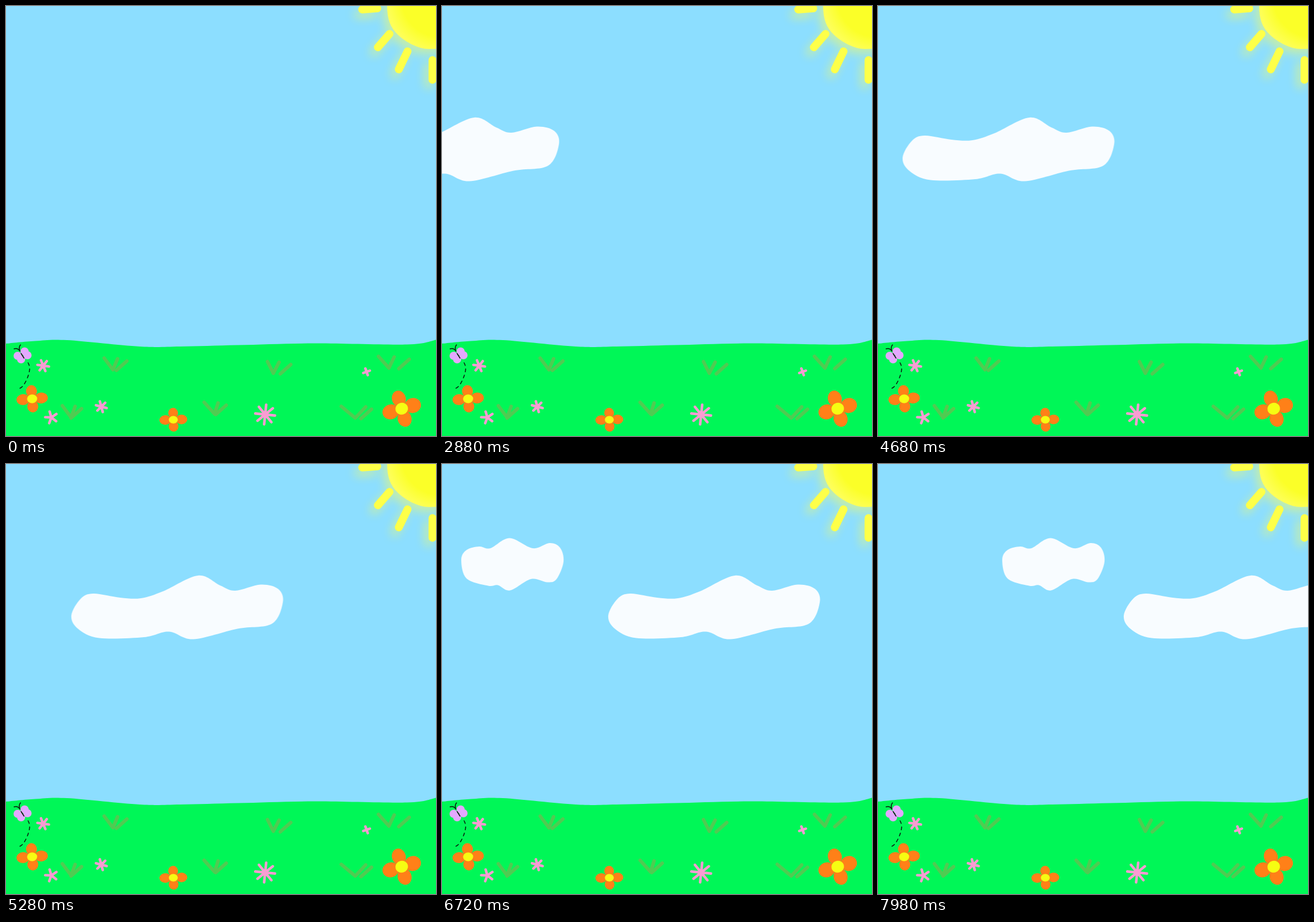
Animation of 740x740 px, one loop 8 s. Source, as an HTML page:

```html
<!DOCTYPE html>
<html lang="en">
<head>
<meta charset="utf-8">
<title>Meadow</title>
<style>
  html, body { margin: 0; width: 100%; height: 100%; overflow: hidden; background: #8cdeff; }
  svg { display: block; width: 740px; height: 740px; }
  .glow { filter: drop-shadow(-7px 9px 8px rgba(255, 255, 80, .48)); }
  .cloud { fill: #f8fcff; }
  .petal { fill: #ff8018; }
  .eye { fill: #f6fd12; }
  .rays, .grass, .pink, .ink, .wings { fill: none; stroke-linecap: round; stroke-linejoin: round; }
  .rays { stroke: #feff48; stroke-width: 13.5; }
  .grass { stroke: #50cb52; stroke-width: 6; }
  .pink { stroke: #f99cd2; stroke-width: 4.4; }
  .wings { stroke: #e3a8ff; stroke-width: 14; }
  .ink { stroke: #0a140c; stroke-width: 1.5; }
</style>
</head>
<body>
<svg viewBox="0 0 740 740">
  <defs>
    <radialGradient id="sun" gradientUnits="userSpaceOnUse" cx="748" cy="-14" r="96">
      <stop offset=".7" stop-color="#fbff28"/>
      <stop offset="1" stop-color="#feff5c"/>
    </radialGradient>
  </defs>
  <g class="glow">
    <path fill="url(#sun)" d="M656 -20V0C656 22 661 37 675 50C688 62 709 74 728 74L760 73V-20Z"/>
    <path class="rays" d="M613 6L639 4M660 48L640 71M691 78L676 109M734 93V127"/>
  </g>

  <path class="cloud" id="big"/>
  <path class="cloud" id="small"/>
  <path id="hill" fill="#00f757"/>
  <path class="grass" id="grass"/>
  <path class="pink" id="pink"/>
  <g id="flowers"></g>

  <path class="wings" d="M20 602h0M26 608h0M32 594.500h0M37 601h0"/>
  <path class="ink" d="M26 598L31 606M24 594Q20 588 14 590M24 594Q21 588 25 583"/>
  <path class="ink" stroke-dasharray="5 6" d="M38 614Q42 621 40 630T33 648T23 658"/>
</svg>

<script>
const $ = id => document.getElementById(id);
const draw = (id, d) => $(id).setAttribute('d', d);

// Catmull-Rom curve through points written as "x,y x,y ...".
function smooth(text, closed) {
  const p = text.split(' ').map(s => s.split(',').map(Number));
  const n = p.length;
  const at = i => closed ? p[(i + n) % n] : p[Math.max(0, Math.min(n - 1, i))];
  let d = `M${p[0]}`;
  for (let i = 0; i < (closed ? n : n - 1); i++) {
    const [a, b, c, e] = [at(i - 1), at(i), at(i + 1), at(i + 2)];
    const c1 = b.map((v, k) => v + (c[k] - a[k]) / 6);
    const c2 = c.map((v, k) => v - (e[k] - b[k]) / 6);
    d += `C${c1} ${c2} ${c}`;
  }
  return d;
}

draw('big', smooth('0,261 16,232 38,223 84,230 120,231 158,219 218,192 256,209 282,218 ' +
  '326,207.5 356,215 364,238 345,275 286,283.5 210,301.5 168,288.5 125,298 48,299.5 12,284', true));
draw('small', smooth('0,165 9,148 31,142 50,145 83,127.5 123,145 152,136 170,144 176,168 ' +
  '164,198 148,203.5 120,198 84,217.5 63,208.5 46,209.5 9,197', true));
draw('hill', smooth('0,581 50,576.5 105,575 230,586 300,586 400,583.5 530,580.5 690,582.5 740,574.5') +
  'V740H0Z');

// Three blades: one falls left by w, one leans right, one stands off by a gap.
const tuft = (x, y, w, lean, gap) =>
  `M${x - w} ${y - 20}L${x} ${y}L${x + lean} ${y - 19}M${x + gap} ${y + 1}l18 -16`;
draw('grass', [
  tuft(184, 626, 15, 8, 6), tuft(460, 632, 10, 10, 12), tuft(659, 623, 18, 9, 17),
  tuft(359, 702, 18, 6, 2), tuft(601, 709, 24, 18, 10), tuft(112, 708, 15, 7, 0)
].join(''));

function star(x, y, r, arms, turn) {
  let d = '';
  for (let i = 0; i < arms; i++) {
    const a = (turn + i * 360 / arms) * Math.PI / 180;
    d += `M${x} ${y}l${r * Math.cos(a)} ${r * Math.sin(a)}`;
  }
  return d;
}
draw('pink', star(64, 619, 10, 6, 8) + star(78, 708, 10.5, 5, 38) + star(164, 689.5, 9.5, 6, 15) +
  star(446, 703, 17, 8, 6) + star(620.5, 629.5, 6, 4, -20));

// Four petals and an eye in a unit box, stretched to w by h.
function flower(x, y, w, h, tilt) {
  const oval = (cls, cx, cy, rx, ry) =>
    `<ellipse class="${cls}" cx="${cx}" cy="${cy}" rx="${rx}" ry="${ry}"/>`;
  const petals = [-1, 1].map(s =>
    oval('petal', .58 * s, 0, .42, .4) + oval('petal', 0, .56 * s, .35, .44)).join('');
  return `<g transform="translate(${x} ${y}) rotate(${tilt}) scale(${w} ${h})">` +
    petals + oval('eye', 0, 0, .32, .32) + '</g>';
}
$('flowers').innerHTML = flower(45, 676, 27, 23.5, -5) + flower(288, 712, 24, 20.5, -2) +
  flower(681, 693, 34, 32, -16);

// Both clouds follow one drift of [ms, px]; the small one runs faster and further behind.
const LOOP = 8000;
const drift = [[0, -476], [3500, -95.5], [5860, 180], [6720, 286], [LOOP, 425]];
function float(id, speed, shift) {
  const frames = drift.map(([t, x]) =>
    ({ offset: t / LOOP, transform: `translate(${x * speed + shift}px, 0px)` }));
  $(id).animate(frames, { duration: LOOP, iterations: Infinity });
}
float('big', 1, 0);
float('small', 1.32, -344.5);
</script>
</body>
</html>
```
